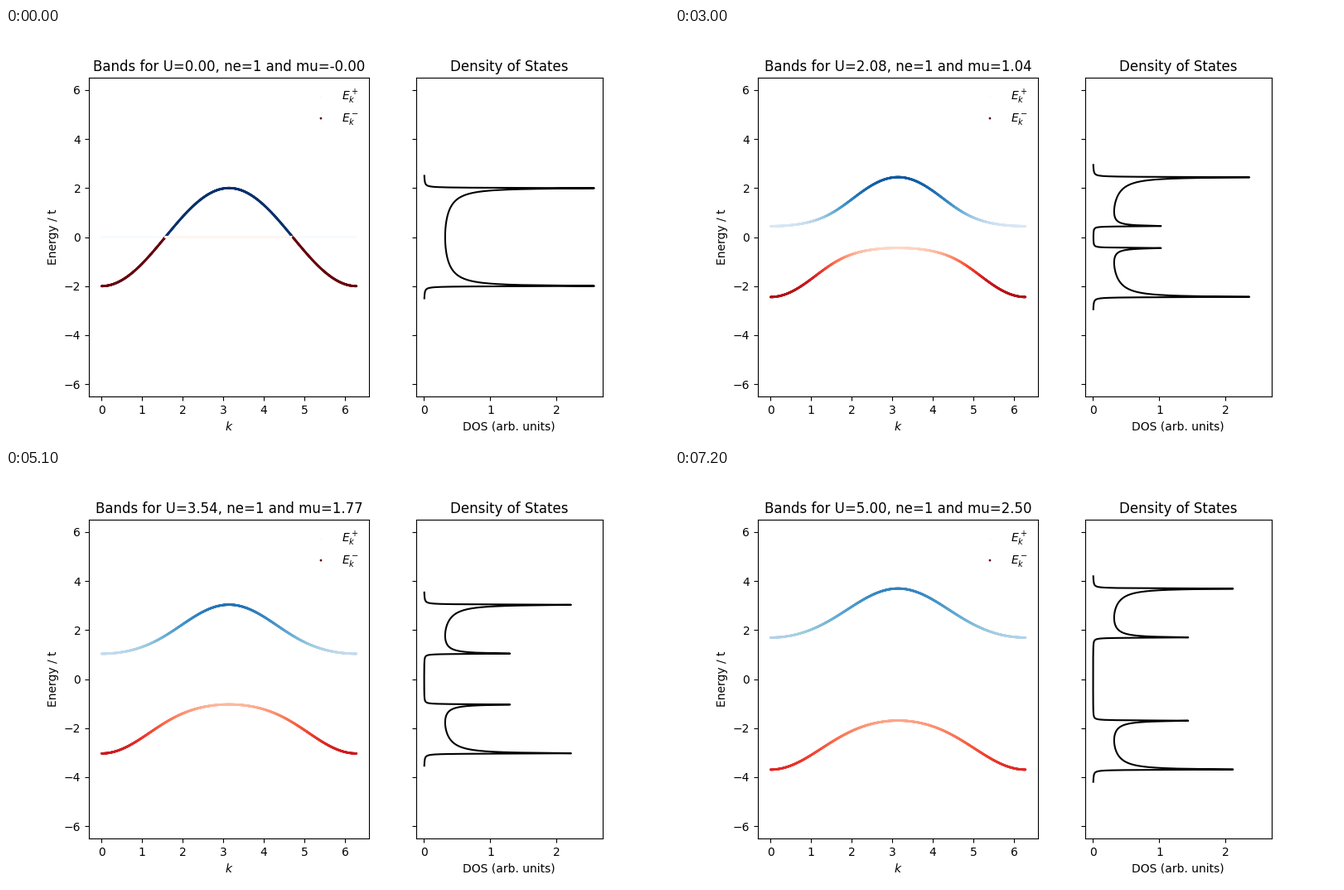
These frames come from a looping animation (800x500 px, 7.5 s). A matplotlib script:

```python
import numpy as np
import matplotlib.pyplot as plt
from matplotlib.animation import FuncAnimation

# Two Hubbard bands of a half-filled chain, with U swept from 0 to 5
FRAMES, INTERVAL = 25, 300
ETA = 0.01
U_VALUES = np.linspace(0, 5, FRAMES)

k = np.linspace(0, 2 * np.pi, 1000)
eps = -2 * np.cos(k)


def bands(u):
    """Return (energy, spectral weight) for the upper and lower band."""
    root = np.hypot(eps, u)
    ratio = eps / np.maximum(root, 1e-12)
    return [((eps + s * root) / 2, (1 + s * ratio) / 2) for s in (1, -1)]


def density(u):
    """Broadened density of states from the local Green's function."""
    top = 1 + np.hypot(2, u) / 2 + 0.5
    w = np.linspace(-top, top, 2000)
    z = w + 1j * ETA
    x = z - u**2 / (4 * z)
    g = 1 / (np.sqrt(x - 2) * np.sqrt(x + 2))
    return -2 / np.pi * g.imag, w


def title(u):
    mu = u / 2 if u else -0.0
    return f"Bands for U={u:.2f}, ne=1 and mu={mu:.2f}"


fig, (ax_k, ax_d) = plt.subplots(
    1, 2, figsize=(8, 5), dpi=100, sharey=True,
    gridspec_kw={"width_ratios": [3, 2]})

dots = [
    ax_k.scatter(k, energy, c=weight, s=1, cmap=cmap, vmin=0, vmax=1, label=label)
    for (energy, weight), cmap, label in zip(
        bands(0), ("Blues", "Reds"), ("$E_k^+$", "$E_k^-$"))
]
heading = ax_k.set_title(title(0))
ax_k.set(xlabel="$k$", ylabel="Energy / t", ylim=(-6.5, 6.5))
ax_k.legend(loc="upper right", frameon=False)

curve, = ax_d.plot(*density(0), color="black")
ax_d.set(title="Density of States", xlabel="DOS (arb. units)")


def update(i):
    u = U_VALUES[i]
    for dot, (energy, weight) in zip(dots, bands(u)):
        dot.set_offsets(np.column_stack((k, energy)))
        dot.set_array(weight)
    curve.set_data(*density(u))
    heading.set_text(title(u))
    return *dots, curve, heading


anim = FuncAnimation(fig, update, frames=FRAMES, interval=INTERVAL,
                     repeat=True, repeat_delay=0)
plt.show()
```
